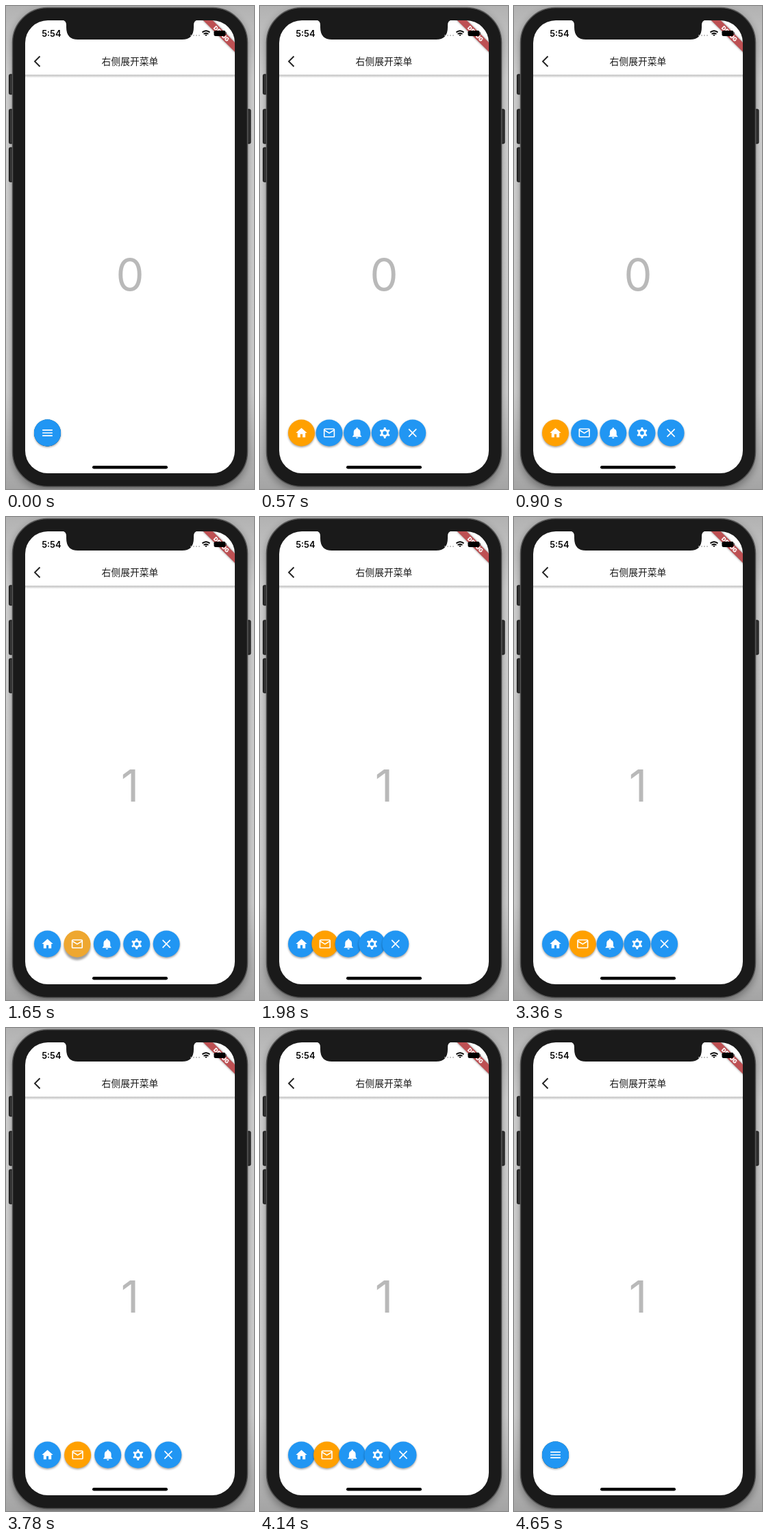
Recreate the animation shown at these times as an HTML page. Size 362x706 px, loop 4710 ms.

```html
<!DOCTYPE html>
<html lang="zh">
<head>
<meta charset="utf-8">
<style>
html, body { margin: 0; width: 362px; height: 706px; overflow: hidden; }
svg { display: block; }
text { font-family: Inter, "Liberation Sans", sans-serif; text-anchor: middle; }
.line { fill: none; stroke: #fff; stroke-width: 2; }
</style>
</head>
<body>
<svg width="362" height="706" viewBox="0 0 362 706">
  <defs>
    <linearGradient id="wall" x2="0" y2="1">
      <stop stop-color="#b2b2b2"/>
      <stop offset=".15" stop-color="#d2d2d2"/>
      <stop offset=".8" stop-color="#cfcfcf"/>
      <stop offset="1" stop-color="#a4a4a4"/>
    </linearGradient>
    <linearGradient id="barShade" x2="0" y2="1">
      <stop stop-color="#000" stop-opacity=".27"/>
      <stop offset="1" stop-color="#000" stop-opacity="0"/>
    </linearGradient>
    <filter id="soft" x="-50%" y="-50%" width="200%" height="200%"><feGaussianBlur stdDeviation="1.7"/></filter>
    <filter id="glow" x="-20%" y="-20%" width="140%" height="140%"><feGaussianBlur stdDeviation="6"/></filter>
    <clipPath id="screen"><rect x="28" y="21" width="306" height="662" rx="33"/></clipPath>
  </defs>

  <rect width="362" height="706" fill="url(#wall)"/>
  <rect x="9" y="6" width="344" height="702" rx="52" opacity=".35" filter="url(#glow)"/>
  <g fill="#303030" stroke="#111">
    <rect x="4.5" y="100" width="8" height="29" rx="1.5"/>
    <rect x="4.5" y="151" width="8" height="50" rx="1.5"/>
    <rect x="4.5" y="207" width="8" height="50" rx="1.5"/>
    <rect x="349" y="151" width="8" height="50" rx="1.5"/>
  </g>
  <rect x="9.5" y="2.5" width="343" height="700" rx="51" fill="#1a1a1a" stroke="#555" stroke-width="1.5"/>

  <g clip-path="url(#screen)">
    <rect x="28" y="21" width="306" height="662" fill="#fff"/>
    <rect x="28" y="100.5" width="306" height="4.5" fill="url(#barShade)"/>
    <path d="M49.5 73.5L42 81l7.500 7.500" fill="none" stroke="#222" stroke-width="1.9"/>
    <text x="181" y="86.300" font-size="13.800" font-weight="500" fill="#1c1c1c"
      style="font-family:'Noto Sans CJK SC','Noto Sans CJK',sans-serif">右侧展开菜单</text>
    <text id="count" x="181" y="415.500" font-size="65" fill="#b9b9b9">0</text>
    <g id="menu"></g>
    <g transform="translate(334 21) rotate(45)">
      <rect x="-40" y="22.800" width="80" height="9.800" opacity=".5" filter="url(#soft)"/>
      <rect x="-40" y="22.800" width="80" height="9.800" fill="#bd5053"/>
      <text y="30.600" font-size="8.200" font-weight="900" fill="#fff">DEBUG</text>
    </g>
    <rect x="126" y="672" width="110" height="4.500" rx="2.250"/>
  </g>

  <path d="M82 20.500Q88 21 88 28V31Q88 49 105 49H257Q274 49 274 31V28Q274 21 280 20.500Z" fill="#1a1a1a"/>
  <text x="66.300" y="44.500" font-size="12.800" font-weight="600">5:54</text>
  <path d="M270 43h13" stroke="#aaa" stroke-width="1.800" stroke-linecap="round" stroke-dasharray="0 4"/>
  <g fill="none" stroke="#000" stroke-width="1.900">
    <path d="M286.500 38.600q5.500-4.600 11 0M288.600 41q3.400-2.700 6.800 0"/>
    <path d="M290.300 42.200L292 44l1.700-1.800q-1.700-1.200-3.400 0z" fill="#000" stroke="none"/>
  </g>
  <rect x="303.500" y="36" width="17" height="8" rx="2.300"/>
  <path d="M321.500 38.500v3" stroke="#555" stroke-width="1.200"/>
</svg>

<script>
const LOOP = 4710, SLIDE = 700, GAP = 44.1;
const PICK = 1620;
// start time and direction of each slide
const slides = [[294, 1], [PICK, -1], [2880, 1], [3900, -1]];
// button index, finger down, finger up
const presses = [[4, 180, 294], [1, 1530, PICK], [4, 2850, 2880], [4, 3850, 3900]];

const gear = '<circle class="line" cx="12" cy="12" r="5.250" style="stroke-width:3.500"/>' +
  [0, 60, 120, 180, 240, 300].map(a =>
    `<path d="M10 6.500L10.500 2.300h3L14 6.500z" fill="#fff" transform="rotate(${a} 12 12)"/>`).join('');
const icons = [
  '<path fill="#fff" d="M10 20v-6h4v6h5v-8h3L12 3 2 12h3v8z"/>',
  '<rect class="line" x="3" y="5" width="18" height="14" rx="1"/><path class="line" d="M3 6.800l9 5.600 9-5.600"/>',
  '<path fill="#fff" d="M12 22c1.100 0 2-.9 2-2h-4c0 1.100.9 2 2 2zm6-6v-5c0-3.070-1.640-5.640-4.500-6.320V4a1.500 1.500 0 0 0-3 0v.68C7.630 5.360 6 7.920 6 11v5l-2 2v1h16v-1z"/>',
  gear,
  '<path class="line"/>'
];
const BARS = 'M3 7h18M3 12h18M3 17h18';
const CROSS = 'M5.200 5.200L18.800 18.800M18.800 5.200L5.200 18.800';

const menu = document.getElementById('menu');
const count = document.getElementById('count');
menu.innerHTML = icons.map(icon => `<g>
  <circle class="shade" r="19.500" filter="url(#soft)"/>
  <circle class="face" r="19.500"/>
  <circle class="touch" r="19.500" fill="#bcbcbc"/>
  <g transform="scale(.816) translate(-12 -12)">${icon}</g></g>`).join('');
const buttons = [...menu.children].map(node => ({
  node,
  shade: node.querySelector('.shade'),
  face: node.querySelector('.face'),
  touch: node.querySelector('.touch')
}));
const toggle = menu.lastElementChild.querySelector('path');

const clamp = v => Math.max(0, Math.min(1, v));

function bounceOut(t) {
  const k = 7.5625, d = 2.75;
  if (t < 1 / d) return k * t * t;
  if (t < 2 / d) return k * (t - 1.5 / d) ** 2 + .75;
  if (t < 2.5 / d) return k * (t - 2.25 / d) ** 2 + .9375;
  return k * (t - 2.625 / d) ** 2 + .984375;
}

function pressure(i, t) {
  return presses.reduce((p, [b, down, up]) => b === i && t >= down
    ? Math.max(p, Math.min(clamp((t - down) / 60), clamp(1 - (t - up) / 200))) : p, 0);
}

function draw(t) {
  const open = slides.reduce((s, [start, dir]) => s + dir * clamp((t - start) / SLIDE), 0);
  const step = GAP * bounceOut(clamp(open));
  const active = t < PICK ? 0 : 1;
  count.textContent = active;
  toggle.setAttribute('d', open > .001 ? CROSS : BARS);
  buttons.forEach((b, i) => {
    const p = pressure(i, t);
    b.node.setAttribute('transform', `translate(${60.5 + i * step} 624)`);
    b.shade.setAttribute('cy', 1.6 + 3 * p);
    // stacked shadows would darken the closed menu
    b.shade.setAttribute('opacity', open > .001 || i === 4 ? .38 : 0);
    b.face.setAttribute('fill', i === active ? '#ffa000' : '#2196f3');
    b.touch.setAttribute('opacity', .3 * p);
  });
}

const begin = performance.now();
function tick() {
  draw((performance.now() - begin) % LOOP);
  requestAnimationFrame(tick);
}
draw(0);
tick();
</script>
</body>
</html>
```
